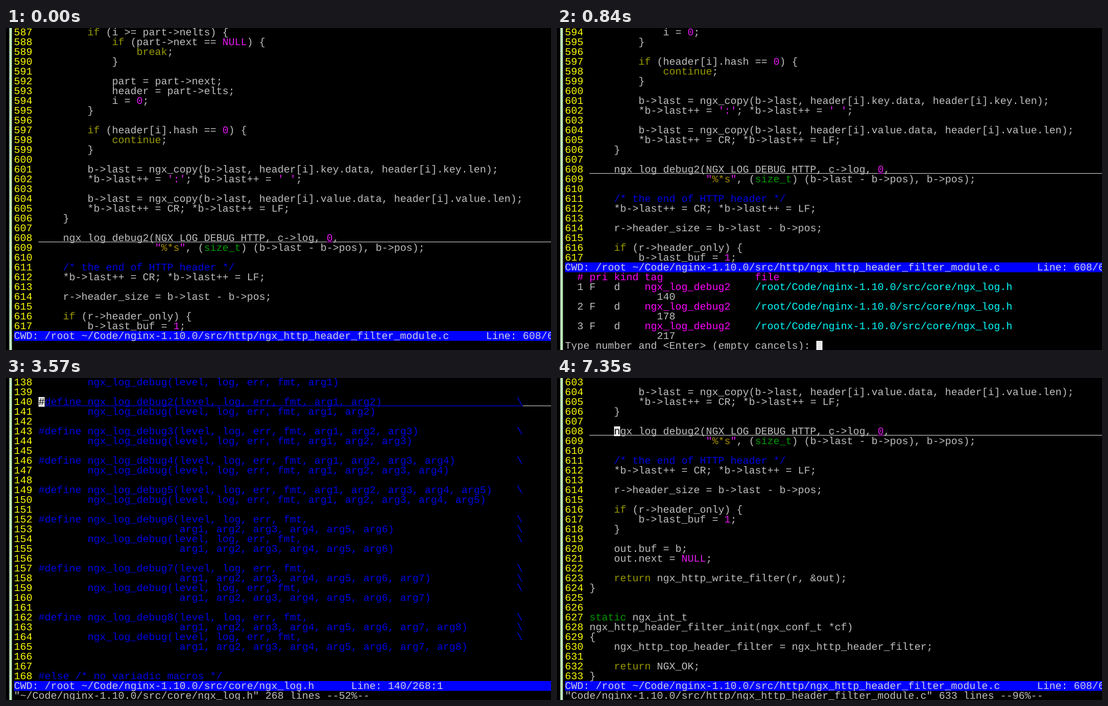
An HTML page for the animation above (7.77 s loop, 889 by 526 pixels).

```html
<!DOCTYPE html>
<html lang="en">
<head>
<meta charset="utf-8">
<title>Tag jump in a terminal editor</title>
<style>
html, body { margin: 0; width: 889px; height: 526px; overflow: hidden; background: #000; }
svg { display: block; }
text {
  font: 16.66px "Liberation Mono", monospace;
  text-rendering: geometricPrecision;
  font-variant-ligatures: none;
}
rect { shape-rendering: crispEdges; }
</style>
</head>
<body>
<svg width="889" height="526" viewBox="0 0 889 526">
  <rect width="889" height="526"/>
  <rect x="5" width="5" height="526" fill="#7c867c"/>
  <rect x="6" width="3" height="526" fill="#c0f0bc"/>
  <g id="screen"></g>
</svg>
<script>
const LOOP = 7770, LEFT = 13, CELL = 10, ROW = 16, WIDTH = 889, GUTTER = 4;
const COLOR = {
  plain: '#c0c0c0', number: '#ffff00', keyword: '#999900', type: '#009a00',
  constant: '#e818f4', special: '#a89000', comment: '#0000e6',
  tag: '#ff00ff', path: '#00ffff', bar: '#0000ff', barText: '#d0d0e0', cursor: '#e8e8e8'
};

const moduleLines = String.raw`
        if (i >= part->nelts) {
            if (part->next == NULL) {
                break;
            }

            part = part->next;
            header = part->elts;
            i = 0;
        }

        if (header[i].hash == 0) {
            continue;
        }

        b->last = ngx_copy(b->last, header[i].key.data, header[i].key.len);
        *b->last++ = ':'; *b->last++ = ' ';

        b->last = ngx_copy(b->last, header[i].value.data, header[i].value.len);
        *b->last++ = CR; *b->last++ = LF;
    }

    ngx_log_debug2(NGX_LOG_DEBUG_HTTP, c->log, 0,
                   "%*s", (size_t) (b->last - b->pos), b->pos);

    /* the end of HTTP header */
    *b->last++ = CR; *b->last++ = LF;

    r->header_size = b->last - b->pos;

    if (r->header_only) {
        b->last_buf = 1;
    }

    out.buf = b;
    out.next = NULL;

    return ngx_http_write_filter(r, &out);
}


static ngx_int_t
ngx_http_header_filter_init(ngx_conf_t *cf)
{
    ngx_http_top_header_filter = ngx_http_header_filter;

    return NGX_OK;
}`.slice(1).split('\n');

function macroLines() {
  const args = n => Array.from({ length: n }, (_, i) => 'arg' + (i + 1)).join(', ') + ')';
  const more = s => s.padEnd(78) + '\\';
  const call = '        ngx_log_debug(level, log, err, fmt,';
  const indent = ' '.repeat(23);
  const lines = [call + ' ' + args(1), ''];
  for (let n = 2; n <= 8; n++) {
    const define = `#define ngx_log_debug${n}(level, log, err, fmt,`;
    if (n < 6) lines.push(more(define + ' ' + args(n)), call + ' ' + args(n), '');
    else lines.push(more(define), more(indent + args(n)), more(call), indent + args(n), '');
  }
  return [...lines, '', '#else /* no variadic macros */'];
}

const moduleFile = { first: 587, lines: moduleLines, current: 608 };
const headerFile = { first: 138, lines: macroLines(), current: 140, preproc: true };
const modulePath = 'Code/nginx-1.10.0/src/http/ngx_http_header_filter_module.c';
const headerPath = 'Code/nginx-1.10.0/src/core/ngx_log.h';

const escapeText = s => s.replace(/&/g, '&amp;').replace(/</g, '&lt;').replace(/>/g, '&gt;');
const colX = col => LEFT + col * CELL;
const rowY = row => row * ROW - 1;
const box = (x, y, w, h, fill) => `<rect x="${x}" y="${y}" width="${w}" height="${h}" fill="${fill}"/>`;

// Every word starts on its own terminal cell.
function print(row, col, str, fill) {
  return [...str.matchAll(/\S+/g)].map(m =>
    `<text x="${colX(col + m.index)}" y="${rowY(row) + 13}" fill="${fill}">${escapeText(m[0])}</text>`
  ).join('');
}

function tokenize(line) {
  const rules = /(\/\*.*\*\/)|(%\*s)|(["']|(?<=')[: ](?='))|\b(if|break|continue|return)\b|\b(static|size_t)\b|\b(NULL|\d+)\b/g;
  const kinds = ['comment', 'special', 'constant', 'keyword', 'type', 'constant'];
  const tokens = [];
  let end = 0;
  const add = (from, to, kind) => {
    if (to > from) tokens.push({ col: from, str: line.slice(from, to), fill: COLOR[kind] });
  };
  for (const m of line.matchAll(rules)) {
    add(end, m.index, 'plain');
    end = m.index + m[0].length;
    add(m.index, end, kinds[m.slice(1).findIndex(Boolean)]);
  }
  add(end, line.length, 'plain');
  return tokens;
}

function drawFile(file, top, rows) {
  let out = '';
  for (let row = 0; row < rows; row++) {
    const number = top + row;
    const line = file.lines[number - file.first];
    const tokens = file.preproc ? [{ col: 0, str: line, fill: COLOR.comment }] : tokenize(line);
    const underline = rowY(row) + 14;
    const current = number === file.current;
    out += print(row, 0, String(number), COLOR.number);
    if (current) out += box(colX(GUTTER), underline, WIDTH, 1, COLOR.plain);
    for (const { col, str, fill } of tokens) {
      out += print(row, GUTTER + col, str, fill);
      if (current) out += box(colX(GUTTER + col), underline, str.length * CELL, 1, fill);
    }
  }
  return out;
}

function drawStatus(row, path, position) {
  return box(LEFT, rowY(row), WIDTH - LEFT, ROW, COLOR.bar) +
    print(row, 0, `CWD: /root ~/${path}      Line: ${position}`, COLOR.barText);
}

function drawMatches(row, end) {
  let out = print(row++, 0, '  # pri kind tag               file', COLOR.tag);
  [140, 178, 217].forEach((line, i) => {
    out += print(row, 0, `  ${i + 1} F   d`, COLOR.plain) +
      print(row, 13, 'ngx_log_debug2', COLOR.tag) +
      print(row, 31, '/root/' + headerPath, COLOR.path);
    row++;
    if (row < end) out += print(row++, 15, String(line), COLOR.plain);
  });
  return out;
}

// The status bar lies below the code so that it never cuts off underscores.
const moduleView = (top, rows) =>
  drawStatus(rows, modulePath, '608/633:5') + drawFile(moduleFile, top, rows);
const matchView = typed => moduleView(594, 24) + drawMatches(25, 32) +
  print(32, 0, 'Type number and <Enter> (empty cancels): ' + typed, COLOR.plain);
const headerView = column => drawStatus(31, headerPath, '140/268:' + column) +
  drawFile(headerFile, 138, 31) +
  print(32, 0, `"~/${headerPath}" 268 lines --52%--`, COLOR.plain);

const views = {
  start: moduleView(587, 31),
  opening: moduleView(593, 25) + drawMatches(26, 32),
  prompt: matchView(''),
  typed: matchView('1'),
  header1: headerView(1),
  header2: headerView(2),
  header3: headerView(3),
  back: moduleView(603, 31) + print(32, 0, `"${modulePath}" 633 lines --96%--`, COLOR.plain)
};

// [time, view, cursor column, cursor row, character below it]
const timeline = [
  [0, 'start'], [140, 'start', 8, 21, 'n'], [560, 'start'],
  [770, 'opening'],
  [840, 'prompt', 41, 32, ''], [1540, 'prompt'], [2030, 'prompt', 41, 32, ''],
  [2170, 'typed', 42, 32, ''], [2520, 'typed'], [2940, 'typed', 42, 32, ''], [3430, 'typed'],
  [3570, 'header1', 4, 2, '#'], [4410, 'header1'],
  [4690, 'header2', 5, 2, 'd'],
  [5320, 'header3'], [5810, 'header3', 6, 2, 'e'], [6300, 'header3'],
  [6790, 'header3', 6, 2, 'e'], [7280, 'header3'],
  [7350, 'back', 8, 5, 'n']
];

const screenGroup = document.getElementById('screen');
let shown;

function render(time) {
  const step = timeline.findLast(([start]) => start <= time);
  if (step === shown) return;
  shown = step;
  const [, view, col, row, under] = step;
  const cursor = col === undefined ? '' :
    box(colX(col), rowY(row), CELL, ROW, COLOR.cursor) + print(row, col, under, '#000');
  screenGroup.innerHTML = views[view] + cursor;
}

const began = performance.now();
function tick() {
  render((performance.now() - began) % LOOP);
  requestAnimationFrame(tick);
}
tick();
</script>
</body>
</html>
```
